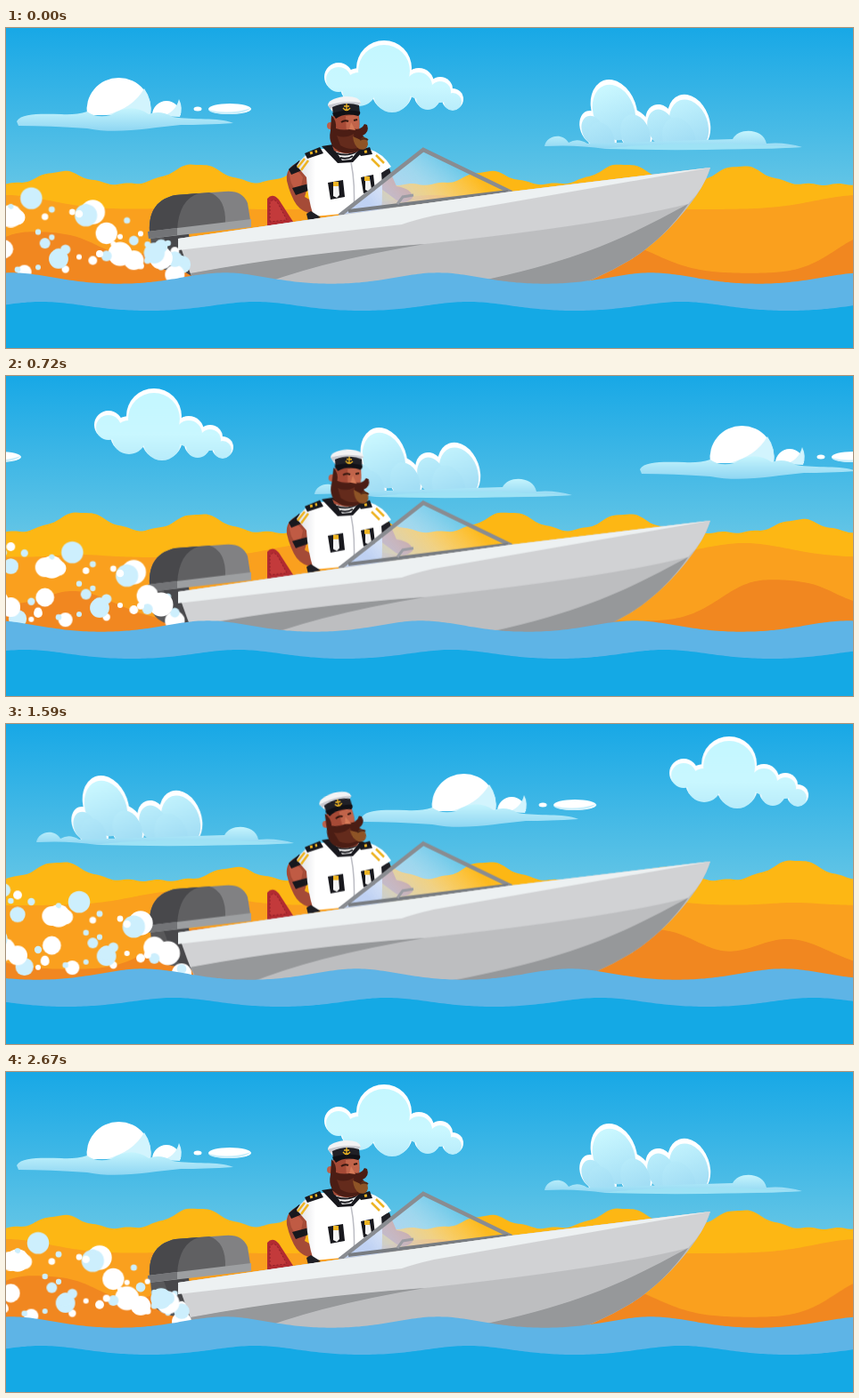
Recreate the animation shown at these times as an HTML page. Size 950 px wide and 360 px high, loop 2700 ms.

```html
<!DOCTYPE html>
<html lang="en">
<head>
<meta charset="utf-8">
<title>Speedboat</title>
<style>
html, body { margin: 0; width: 950px; height: 360px; overflow: hidden; background: #14a9e5; }
svg { display: block; }
/* Scrolling advances every 30 ms and rests on the final step. */
.scroll { --way: -957px; animation: scroll 2.7s infinite; }
#hills { --way: -478.5px; }
#boat { animation: bob 2.7s infinite ease-in-out; }
#head { animation: nod 2.7s infinite ease-in-out; transform-origin: 383px 139px; }
@keyframes scroll {
  0% { transform: translateX(0); animation-timing-function: steps(89); }
  98.89%, 100% { transform: translateX(var(--way)); }
}
@keyframes bob {
  0%, 98.89%, 100% { transform: translateY(0); }
  23.3% { transform: translateY(6px); }
  50% { transform: translateY(-5.5px); }
  73.3% { transform: translateY(4.6px); }
}
@keyframes nod {
  0%, 98.89%, 100% { transform: translateY(0) rotate(0deg); }
  17.8% { transform: translateY(0) rotate(5deg); }
  57.8% { transform: translateY(1px) rotate(-11deg); }
  74% { transform: translateY(2.5px) rotate(-7.5deg); }
}
.drift { animation: drift .9s infinite steps(30); }
.lift { animation: lift .9s infinite cubic-bezier(.1, .6, .4, 1); }
@keyframes drift { to { transform: translateX(-230px); } }
@keyframes lift { from { transform: translateY(var(--from)); } to { transform: translateY(var(--to)); } }
</style>
</head>
<body>
<svg width="950" height="360" viewBox="0 0 950 360">
  <defs>
    <linearGradient id="sky" x2="0" y2="1">
      <stop stop-color="#18a8e6"/><stop offset="1" stop-color="#63c5e6"/>
    </linearGradient>
    <linearGradient id="puff" gradientUnits="userSpaceOnUse" x1="0" y1="20" x2="0" y2="135">
      <stop stop-color="#c4f7ff"/><stop offset=".4" stop-color="#c9f7ff"/><stop offset="1" stop-color="#a0dcf4"/>
    </linearGradient>
    <linearGradient id="mist" x2="0" y2="1">
      <stop stop-color="#c5f4fd"/><stop offset="1" stop-color="#8fd6f2"/>
    </linearGradient>
    <linearGradient id="glass" x1="0" y1=".7" x2="1" y2=".35">
      <stop offset=".12" stop-color="#b9cdf2" stop-opacity=".9"/>
      <stop offset=".5" stop-color="#e3ecf5" stop-opacity=".5"/>
      <stop offset=".8" stop-color="#fff" stop-opacity=".05"/>
    </linearGradient>
    <linearGradient id="shirt">
      <stop stop-color="#dcdde2"/><stop offset=".2" stop-color="#fff"/>
    </linearGradient>
    <clipPath id="low"><rect width="957" height="132"/></clipPath>

    <g id="skyline">
      <!-- flat cloud -->
      <path d="M91 98A36 36 0 1 1 162 98ZM164 98A16 16 0 1 1 196 98Z" fill="#fff"/>
      <path d="M112 98Q143 90 155 68Q165 82 162 100ZM174 99Q190 96 194 80Q199 90 195 100Z" fill="#d2f4fd"/>
      <path d="M12 105C18 95 42 97 62 97Q78 98 91 94Q101 102 118 98C133 88 147 88 160 97Q173 92 187 100C211 104 237 100 255 107Q222 109 196 109C162 112 126 120 91 113Q49 110 14 110Z" fill="url(#mist)"/>
      <ellipse cx="251" cy="91" rx="24" ry="6" fill="#fff"/>
      <path d="M227 92Q250 98 275 90Q267 97 251 97Q230 97 227 92Z" fill="#cbeffb"/>
      <ellipse cx="215" cy="91" rx="4.500" ry="2.500" fill="#fff"/>
      <g id="round"></g>
      <g id="tall" clip-path="url(#low)"></g>
      <!-- low haze -->
      <path d="M604 133C606 121 624 117 631 129Q641 123 652 130L815 125C822 111 850 113 853 130Q873 128 893 134Q850 137 808 136H672Q640 131 604 133Z" fill="url(#mist)"/>
      <path d="M672 136Q704 130 814 130L893 134Q774 139 672 136Z" fill="#9ee2f5"/>
    </g>
  </defs>

  <rect width="950" height="180" fill="url(#sky)"/>
  <g class="scroll">
    <use href="#skyline"/>
    <use href="#skyline" x="957"/>
  </g>
  <g id="hills" class="scroll"></g>

  <g id="boat">
    <!-- outboard motor -->
    <path d="M162 235L200 230V276Q168 274 164 258Z" fill="#58585a"/>
    <path d="M177 235L205 231L210 280L189 268Z" fill="#48484b"/>
    <path d="M161 229C160 204 171 192 190 188L245 184Q265 182 271 197L274 216Z" fill="#818183"/>
    <path d="M161 229C160 204 171 192 190 188L228 185Q247 191 246 220Z" fill="#606062"/>
    <path d="M161 229C160 204 171 192 190 188L216 186Q194 193 192 227Z" fill="#48484b"/>
    <path d="M159 229L275 215V224L160 237Z" fill="#9d9fa1"/>
    <path d="M159 229L192 225V233L160 237Z" fill="#737477"/>
    <path d="M293 227V192Q299 185 306 193L324 221Z" fill="#b22b31"/>
    <path d="M296 218V196Q301 190 306 199L315 216Z" fill="#c33a3b" stroke="#8e2028" stroke-dasharray="2 2"/>

    <g id="captain">
      <!-- arms -->
      <path d="M328 151Q313 157 315 172Q319 189 326 199Q333 208 345 209L349 198L335 190Q340 176 339 158Z" fill="#a54b37"/>
      <path d="M318 159Q327 158 333 168L329 188Q316 174 318 159Z" fill="#c05b44"/>
      <path d="M321 180L340 175L342 182L325 188Z" fill="#18181d"/>
      <path d="M414 154L431 162L438 178Q456 181 456 191Q447 200 437 193L421 181Z" fill="#b65e49"/>
      <path d="M414 162L430 158L433 167L419 172Z" fill="#202026"/>
      <path d="M317 159L329 149L337 158L320 165Z" fill="#18181d"/>
      <!-- shirt -->
      <path d="M350 136Q333 142 326 155L337 168Q338 190 345 212L421 205Q423 184 421 163L432 156Q423 141 407 136Z" fill="url(#shirt)"/>
      <path d="M337 209L342 206L353 213L339 217Z" fill="#202026"/>
      <path d="M327 157L335 147M331 160L339 149M410 147L419 156M415 143L424 152" stroke="#edb424" stroke-width="2.500"/>
      <path d="M335 141L352 134L356 141L338 147ZM394 138L408 134L411 142L398 144Z" fill="#18181d"/>
      <path d="M341 141L349 138.500M402 139.500L406 138.500" stroke="#edb424" stroke-width="3" stroke-dasharray="3"/>
      <path d="M354 133L372 152L389 151L403 136L395 132L367 131Z" fill="#18181d"/>
      <path d="M368 136L377 149L387 148L396 136Z" fill="#f3f3f3"/>
      <path d="M371 141Q383 145 393 139M375 146Q383 148 389 144" fill="none" stroke="#18181d" stroke-width="2"/>
      <path d="M366 133Q382 143 397 132L394 139Q380 144 368 138Z" fill="#a54b37"/>
      <path d="M387 151Q392 176 390 207" fill="none" stroke="#bcbdc4" stroke-width="1.500"/>
      <path d="M361 174L378 171L380 190L364 193ZM398 168L412 165L414 183L401 186Z" fill="#18181d"/>
      <path d="M367 176L373 175L374 188L371 191L367 189ZM403 170L408 169L410 181L407 184L403 182Z" fill="#f4f4f4"/>
      <path d="M367 173H373V178H367ZM402 167H408V172H402Z" fill="#edb424"/>
      <g id="head">
        <path d="M367 97L395 94Q398 107 395 125L370 127Q364 113 367 97Z" fill="#a64a36"/>
        <path d="M381 99L395 97Q398 109 394 119L382 121Z" fill="#c1644a"/>
        <circle cx="364" cy="110" r="4" fill="#bc614a"/>
        <path d="M365 98Q371 104 370 113Q380 116 388 113Q398 116 402 108L405 109Q408 117 400 121Q407 126 402 134Q391 143 377 140Q360 134 364 115Z" fill="#4b1d14"/>
        <path d="M371 121Q380 125 390 119Q390 129 398 134Q386 139 375 132Z" fill="#642b1c"/>
        <path d="M376 106Q380 103 384 105M390 104L394 103" fill="none" stroke="#35170f" stroke-width="2"/>
        <path d="M387 106L392 115L385 114Z" fill="#d77b58"/>
        <path d="M389 122L398 126Q398 122 405 124L406 131Q404 139 396 136Q390 132 389 122Z" fill="#8e5426"/>
        <path d="M397 126Q402 123 406 126" fill="none" stroke="#4e2918" stroke-width="2"/>
        <path d="M361 87Q361 80 379 77Q396 76 398 84L392 91L366 94Z" fill="#f3f3f4"/>
        <path d="M361 87Q379 81 398 84L394 88Q377 85 364 91Z" fill="#c9cad0"/>
        <path d="M366 89Q381 82 396 87L397 97Q383 92 367 99Z" fill="#202026"/>
        <path d="M366 96Q382 90 397 94Q398 97 395 99Q380 95 370 102Z" fill="#111116"/>
        <path d="M382 85V92M379 88H385M378 90Q382 95 386 90" fill="none" stroke="#edb424" stroke-width="1.300"/>
      </g>
    </g>

    <!-- windshield -->
    <path d="M374 211L468 137L567 185Z" fill="url(#glass)"/>
    <path d="M374 211L468 137L567 185" fill="none" stroke="#898c91" stroke-width="4.500"/>
    <path d="M384 206L563 184" stroke="#787c81" stroke-width="4"/>
    <path d="M439 198L445 190L457 188" fill="none" stroke="#9b9ca3" stroke-width="3"/>

    <!-- hull -->
    <path d="M193 237L372 211L567 184L790 157C782 186 742 235 700 261Q660 285 622 295H215Q202 267 193 237Z" fill="#bdbec0"/>
    <path d="M193 237L372 211L567 184L790 157Q782 182 765 198Q673 221 470 243Q330 255 207 276Z" fill="#d1d2d4"/>
    <path d="M193 237L372 211L567 184L790 157L480 211Q458 216 444 221L193 250Z" fill="#edf1f2"/>
    <path d="M207 276Q330 253 470 243Q344 264 270 295H216Z" fill="#96989a"/>
    <path d="M765 198C752 218 728 244 700 261Q660 285 622 295H480Q570 278 620 262C680 244 720 222 765 198Z" fill="#96989a"/>
  </g>

  <g id="spray"></g>
  <g id="water" class="scroll"></g>
</svg>
<script>
const $ = id => document.getElementById(id);
const tile = 478.5;

function add(parent, tag, attrs) {
  const el = document.createElementNS('http://www.w3.org/2000/svg', tag);
  for (const key in attrs) el.setAttribute(key, attrs[key]);
  return parent.appendChild(el);
}

// Area under y = height(x)
function area(parent, fill, height) {
  let d = 'M0 360';
  for (let x = 0; x <= 1910; x += 3) d += `L${x} ${height(x).toFixed(1)}`;
  add(parent, 'path', { fill, d: d + 'V360Z' });
}

// Each hill is [centre, rise, width], repeated on every tile
function range(fill, base, ripple, ...bumps) {
  area($('hills'), fill, x => {
    let y = base - ripple * Math.sin(x / tile * 30 * Math.PI);
    for (const [centre, rise, width] of bumps) {
      const dx = (x - centre) / tile;
      y -= rise * Math.exp(-(((dx - Math.round(dx)) * tile / width) ** 2));
    }
    return y;
  });
}
range('#fdb714', 176, 1, [62, 15, 33], [214, 23, 40], [345, 21, 37]);
range('#faa01e', 204, 0, [0, 16, 70], [212, 3, 40]);
range('#f18720', 276, 0, [10, 40, 55], [80, 32, 50], [205, 34, 65]);

function waves(fill, mid, crest, size) {
  area($('water'), fill, x => {
    const a = (x - crest) / tile * 4 * Math.PI;
    return mid - size * Math.cos(a + .2 * Math.sin(a));
  });
}
waves('#5eb4e6', 281.5, 6, 6.2);
waves('#14a9e5', 313, 40, 5);

// Overlapping lobes [x, y, radius] share one bright rim
function cloud(id, stretch, tilt, lobes) {
  for (const rim of [true, false]) {
    for (const [cx, y, r] of lobes) {
      const cy = rim ? y : y + 3, rx = rim ? r : r - 2;
      add($(id), 'ellipse', {
        cx, cy, rx, ry: rx * stretch, transform: `rotate(${tilt} ${cx} ${cy})`,
        fill: rim ? '#fff' : 'url(#puff)'
      });
    }
  }
}
cloud('round', 1, 0, [[373, 55, 16], [424, 45, 31], [396, 66, 21], [433, 71, 23],
  [463, 62, 17], [487, 69, 14], [473, 76, 15], [501, 80, 12]]);
cloud('tall', 1.4, -20, [[682, 92, 25], [766, 106, 23], [735, 109, 17], [658, 112, 14],
  [706, 116, 18], [668, 122, 16], [755, 122, 20]]);

let seed = 41;
const rnd = () => (seed = seed * 16807 % 2147483647) / 2147483647;
for (let i = 0; i < 56; i++) {
  const delay = `animation-delay:${-30 * Math.floor((i + rnd()) * 30 / 56)}ms;`;
  const from = 255 + rnd() * 28, to = 185 + rnd() * 90;
  const g = add($('spray'), 'g', { class: 'drift', style: delay });
  add(g, 'circle', {
    class: 'lift', cx: 197, r: 3 + 11 * rnd() ** 2, fill: rnd() < .5 ? '#fff' : '#cdeffd',
    style: `${delay}--from:${from}px;--to:${to}px`
  });
}
</script>
</body>
</html>
```
